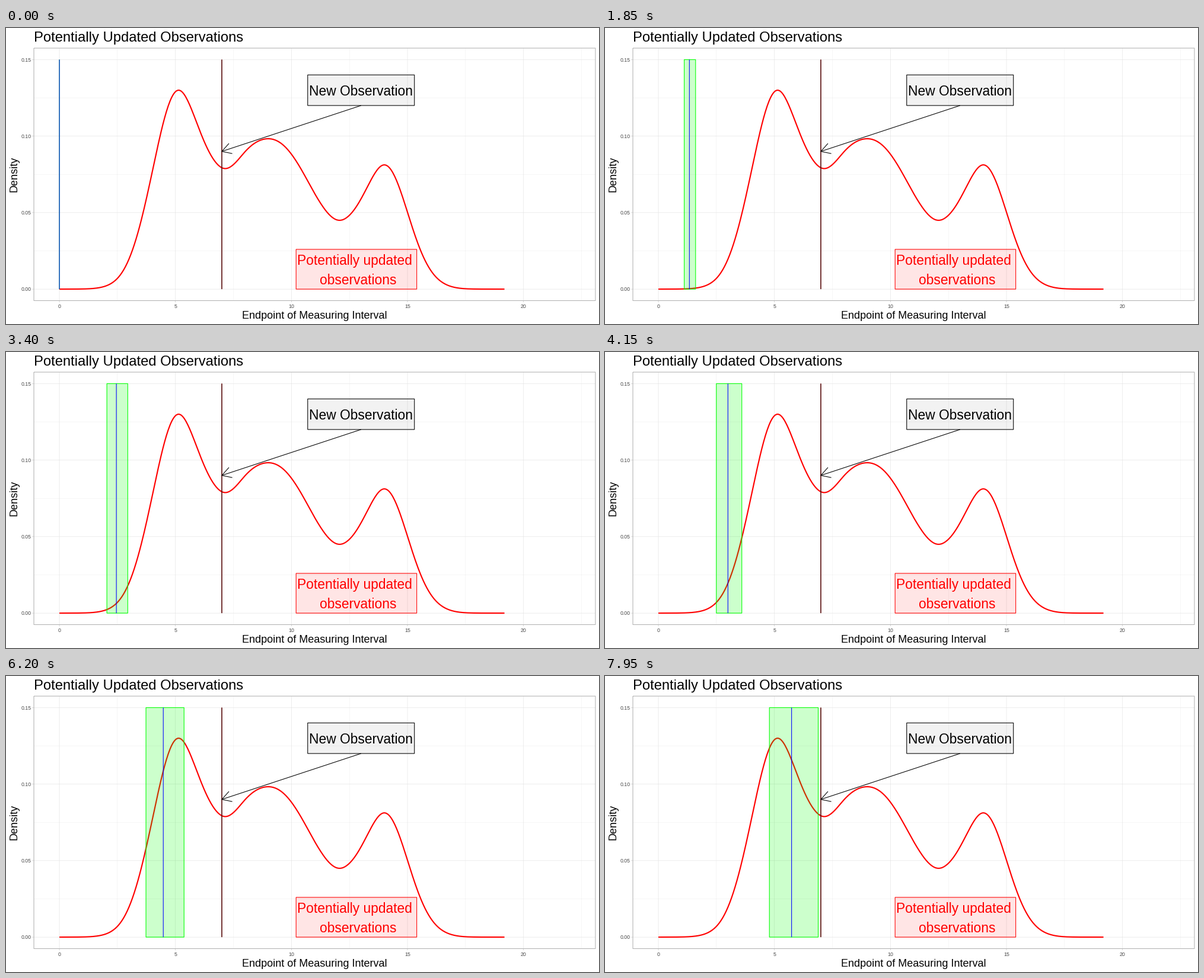
A matplotlib script that plays this animation: 1000x500 px, repeating every 8 s.

```python
import numpy as np
import matplotlib as mpl
import matplotlib.pyplot as plt
from matplotlib.animation import FuncAnimation
from matplotlib.patches import Rectangle

mpl.rcParams["font.family"] = "Liberation Sans"

DPI = 100
PT = 72 / DPI          # points per pixel
THIN = 1.07            # default stroke in pixels
FRAMES, INTERVAL = 160, 50
STEP = 0.0361          # data units the marker moves per frame
RATIO = 1.2            # band reaches from x / RATIO to x * RATIO
GREEN, RED, BLUE = "#00FF00", "#FF0000", "#0000FF"


def px(x):
    return 90.05 + 39.13 * x


def py(y):
    return 441.1 - 2584.8 * y


LEFT, RIGHT = px(-1.1), px(23.1)
TOP, BOTTOM = py(0.1575), py(-0.0075)

fig = plt.figure(figsize=(1000 / DPI, 500 / DPI), dpi=DPI, facecolor="white")
ax = fig.add_axes([0, 0, 1, 1])
ax.set_xlim(0, 1000)
ax.set_ylim(500, 0)
ax.axis("off")


def line(xs, ys, color, width=THIN, **kw):
    artist, = ax.plot(xs, ys, color=color, lw=width * PT, snap=False,
                      solid_capstyle="butt", **kw)
    return artist


def box(x0, x1, y0, y1, edge, alpha):
    fill = mpl.colors.to_rgba(edge, alpha)
    patch = Rectangle((px(x0), py(y1)), px(x1) - px(x0), py(y0) - py(y1),
                      ec=edge, fc=fill, lw=THIN * PT, snap=False, zorder=2)
    return ax.add_patch(patch)


def label(x, y, text, size, color="black", ha="center", **kw):
    ax.text(x, y, text, fontsize=size * PT, color=color, ha=ha,
            va="baseline", **kw)


def grid_lines(xs, ys, width):
    for x in xs:
        line([px(x)] * 2, [TOP, BOTTOM], "#DEDEDE", width)
    for y in ys:
        line([LEFT, RIGHT], [py(y)] * 2, "#DEDEDE", width)


def draw_panel():
    xticks, yticks = np.arange(0, 21, 5), np.arange(4) * 0.05
    grid_lines(np.arange(2.5, 23, 5), yticks[:3] + 0.025, THIN / 4)
    grid_lines(xticks, yticks, THIN / 2)
    for x in xticks:
        line([px(x)] * 2, [BOTTOM, BOTTOM + 2.75], "#B3B3B3", THIN / 2)
        label(px(x), 473, str(x), 8.8, "#4D4D4D")
    for y in yticks:
        line([LEFT - 2.75, LEFT], [py(y)] * 2, "#B3B3B3", THIN / 2)
        label(42.3, py(y) + 3.3, f"{y:.2f}", 8.8, "#4D4D4D", "right")
    line([LEFT, RIGHT, RIGHT, LEFT, LEFT],
         [TOP, TOP, BOTTOM, BOTTOM, TOP], "#B3B3B3")


def spline(knots, values, x):
    """Natural cubic spline, written as cubic radial functions plus a line."""
    def basis(v):
        return np.abs(v[:, None] - knots) ** 3

    def trend(v):
        return np.column_stack([np.ones_like(v), v])

    system = np.block([[basis(knots), trend(knots)],
                       [trend(knots).T, np.zeros((2, 2))]])
    coefs = np.linalg.solve(system, np.append(values, [0, 0]))
    return np.hstack([basis(x), trend(x)]) @ coefs


def density(x):
    # Bell-shaped flanks are parabolas in log space, so few points suffice.
    points = np.array([
        (0, 2.3e-6), (1, 1e-4), (2.3, 0.0044), (3, 0.0197), (3.9, 0.0695),
        (5.13, 0.13), (6.1, 0.1016), (7.13, 0.0788), (8, 0.0898),
        (8.85, 0.0981), (9.7, 0.0934), (10.5, 0.0762), (11.3, 0.0551),
        (12.04, 0.045), (12.9, 0.0564), (13.99, 0.0812), (15, 0.0503),
        (16.2, 0.0084), (17.2, 7e-4), (19.18, 3e-7)])
    return np.exp(spline(points[:, 0], np.log(points[:, 1]), x))


def draw_arrow(x0, y0, x1, y1, size=18, spread=np.pi / 6):
    line([x0, x1], [y0, y1], "black")
    back = np.arctan2(y0 - y1, x0 - x1)
    angles = np.array([back - spread, back + spread])
    hx, hy = x1 + size * np.cos(angles), y1 + size * np.sin(angles)
    line([hx[0], x1, hx[1]], [hy[0], y1, hy[1]], "black",
         solid_joinstyle="round")


draw_panel()
xs = np.linspace(0, 19.18, 500)
line(px(xs), py(density(xs)), RED, 2.13)

span = [py(0), py(0.15)]
band = box(0, 0, 0, 0.15, GREEN, 0.2)
marker = line([px(0)] * 2, span, BLUE, zorder=3)
box(7, 7, 0, 0.15, RED, 0.2)
line([px(7)] * 2, span, "black", zorder=3)

box(10.7, 15.3, 0.12, 0.14, "black", 0.05)
label(px(13), 114, "New Observation", 22.76)
draw_arrow(px(13), py(0.12), px(7), py(0.09))

box(10.2, 15.4, 0, 0.026, RED, 0.1)
label(px(12.8) - 3.2, 400, "Potentially updated", 22.76, RED)
label(px(12.8) + 3.2, 433, "observations", 22.76, RED)

label(LEFT, 23, "Potentially Updated Observations", 23.7, ha="left")
label((LEFT + RIGHT) / 2, 491, "Endpoint of Measuring Interval", 18)
label(18, (TOP + BOTTOM) / 2, "Density", 18, rotation=90,
      rotation_mode="anchor")


def update(i):
    x = i * STEP
    marker.set_xdata([px(x)] * 2)
    band.set_x(px(x / RATIO))
    band.set_width(px(x * RATIO) - px(x / RATIO))
    return band, marker


anim = FuncAnimation(fig, update, frames=FRAMES, interval=INTERVAL,
                     repeat=True, repeat_delay=0)
plt.show()
```
